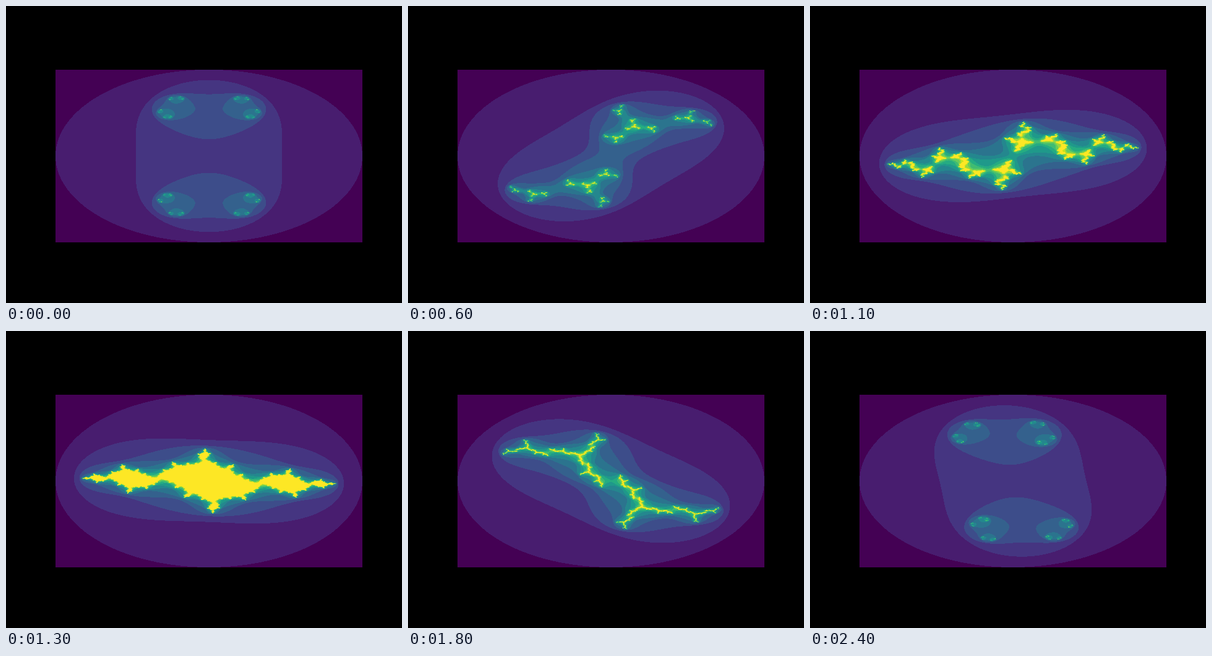
Recreate the animation shown at these times as an HTML page with a canvas. Size 640x480 px, loop 2.5 s.

```html
<!DOCTYPE html>
<html lang="en">
<head>
<meta charset="utf-8">
<title>Julia sets</title>
<style>
  html, body { margin: 0; width: 100%; height: 100%; overflow: hidden; background: #000; }
  canvas { display: block; }
</style>
</head>
<body>
<canvas width="640" height="480"></canvas>
<script>
const STEPS = 25, STEP_MS = 100, RADIUS = 1.1;
const LEFT = 80, TOP = 103, W = 496, H = 279;
const CENTER_X = 328, CENTER_Y = 242.4;

// One viridis colour per escape count
const colors = ['440154', '481d6f', '453581', '3d4d8a', '34618d', '2b748e', '24878e',
  '1f998a', '25ac82', '40bc72', '67cc5c', '97d83f', 'cbe11e', 'fde725']
  .map(hex => [0, 2, 4].map(i => parseInt(hex.slice(i, i + 2), 16)));
const MAX = colors.length - 1;

const ctx = document.querySelector('canvas').getContext('2d');
const image = ctx.createImageData(W, H);

function escapeCount(x, y, cx, cy) {
  let n = 0;
  while (n < MAX && x * x + y * y <= 4) {
    [x, y] = [x * x - y * y + cx, 2 * x * y + cy];
    n++;
  }
  return n;
}

function draw(step) {
  const angle = 2 * Math.PI * step / STEPS;
  const cx = RADIUS * Math.cos(angle), cy = RADIUS * Math.sin(angle);
  let p = 0;
  for (let row = 0; row < H; row++) {
    const y = (TOP + row + 0.5 - CENTER_Y) / (H / 4);
    for (let col = 0; col < W; col++) {
      const x = (LEFT + col + 0.5 - CENTER_X) / (W / 4);
      const [r, g, b] = colors[escapeCount(x, y, cx, cy)];
      image.data[p++] = r;
      image.data[p++] = g;
      image.data[p++] = b;
      image.data[p++] = 255;
    }
  }
  ctx.putImageData(image, LEFT, TOP);
}

let shown = -1;
function tick() {
  const step = Math.floor(performance.now() / STEP_MS) % STEPS;
  if (step !== shown) draw(shown = step);
  requestAnimationFrame(tick);
}
tick();
</script>
</body>
</html>
```
